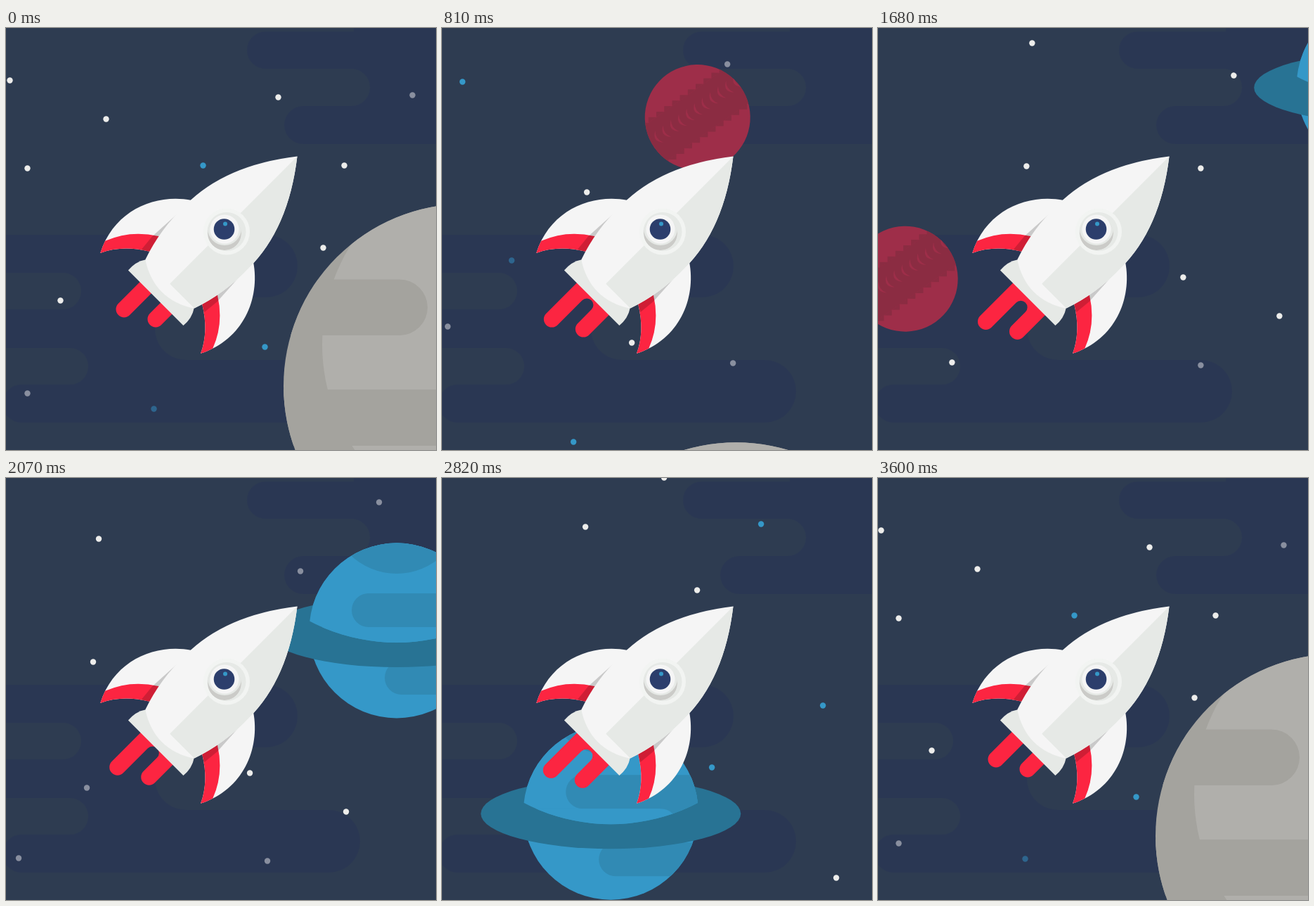
These frames come from a looping animation (612 px wide and 600 px high, 3630 ms). An HTML page with a canvas:

```html
<!DOCTYPE html>
<html lang="en">
<head>
<meta charset="utf-8">
<title>Rocket flight</title>
<style>
html, body { margin: 0; width: 100%; height: 100%; overflow: hidden; background: #2e3c51; }
canvas { display: block; }
</style>
</head>
<body>
<canvas id="stage" width="612" height="600"></canvas>
<script>
const W = 612, H = 600, LOOP = 3630, CYCLE = 3600, STEP = 30;
const TAU = Math.PI * 2;
const ctx = document.getElementById('stage').getContext('2d');

const WHITE = '#f5f5f5', SHADE = '#e6e9e6', RED = '#fc2541';

function disc(c, x, y, r, color) {
  c.fillStyle = color;
  c.beginPath();
  c.arc(x, y, r, 0, TAU);
  c.fill();
}

function pill(c, x1, y1, x2, y2) {
  c.beginPath();
  c.roundRect(x1, y1, x2 - x1, y2 - y1, (y2 - y1) / 2);
  c.fill();
}

function clipDisc(x, y, r) {
  ctx.beginPath();
  ctx.arc(x, y, r, 0, TAU);
  ctx.clip();
}

// Runs a drawing function in its own coordinate system.
function at(x, y, angle, draw) {
  ctx.save();
  ctx.translate(x, y);
  ctx.rotate(angle);
  draw();
  ctx.restore();
}

// Clouds are a translucent layer over the stars.
const clouds = document.createElement('canvas');
clouds.width = W;
clouds.height = H;
{
  const c = clouds.getContext('2d');
  c.fillStyle = '#283456';
  c.fillRect(495, 0, 200, 5);
  pill(c, 343, 5, 700, 58);
  c.fillRect(490, 57, 200, 55);
  pill(c, 396, 111, 700, 165);
  c.fillRect(0, 294, 370, 213);
  pill(c, 300, 294, 415, 383);
  c.fillRect(20, 505, 400, 56);
  pill(c, -5, 507, 300, 561);
  pill(c, 300, 472, 504, 561);
  c.globalCompositeOperation = 'destination-out';
  pill(c, 300, 58, 518, 111);
  pill(c, -60, 348, 107, 400);
  pill(c, -60, 455, 117, 507);
  pill(c, 212, 383, 600, 472);
}

// Star field repeats as a tile while drifting down and left.
const TILE_X = 805, TILE_Y = 600, DRIFT = 806 / CYCLE, FALL = 600 / CYCLE;
const whiteStars = [[5, 74], [142, 129], [30, 199], [387, 98], [481, 195], [451, 312], [77, 387],
  [578, 95], [30, 519], [595, 341], [189, 289], [587, 516]];
const blueStars = [[280, 195], [368, 453], [210, 541]];

const wrap = (v, size) => ((v + 10) % size + size) % size - 10;

function drawStars(t) {
  const plot = (list, color) => list.forEach(([x, y]) =>
    disc(ctx, wrap(x + 0.5 - DRIFT * t, TILE_X), wrap(y + 0.5 + FALL * t, TILE_Y), 4.2, color));
  plot(whiteStars, '#ededeb');
  plot(blueStars, '#3598c8');
}

function drawMoon(t) {
  const early = t < CYCLE / 2;
  const dt = early ? t : t - CYCLE;
  const x = 654 + dt * (early ? -139.5 : -175) / 480;
  const y = 509 + dt * (early ? 201 : 172) / 480;
  at(x, y, 0, () => {
    disc(ctx, 0, 0, 259, '#a4a39e');
    clipDisc(0, 0, 259);
    disc(ctx, 62, -59, 266, '#b0afab');
    ctx.fillStyle = '#a4a39e';
    pill(ctx, -400, -151.5, -54, -72);
    pill(ctx, 72, -151.5, 400, -72);
    pill(ctx, -400, 5, 400, 85);
  });
}

function drawRedPlanet(t) {
  const dt = t - 480, light = '#9e2e49', dark = '#8b2c42';
  at(487 - dt * 269 / 720, 40 + dt * 190 / 720, -0.615, () => {
    disc(ctx, 0, 0, 75, light);
    clipDisc(0, 0, 75);
    ctx.fillStyle = dark;
    ctx.fillRect(-80, -34, 160, 59);
    const pitch = 13.7;
    const tooth = (x, edge, tip, height) => {
      ctx.fillStyle = dark;
      ctx.beginPath();
      ctx.moveTo(x, edge);
      ctx.lineTo(x + tip, edge + height);
      ctx.lineTo(x + pitch, edge);
      ctx.fill();
    };
    for (let x = -82; x < 80; x += pitch) {
      tooth(x + pitch / 2, -34, 4.6, -6.5);
      tooth(x, 25, 9.1, 6.5);
      ctx.fillStyle = light;
      ctx.beginPath();
      ctx.moveTo(x + 8, -19);
      ctx.quadraticCurveTo(x - 5, -9, x + 8, 1);
      ctx.quadraticCurveTo(x + 1, -9, x + 8, -19);
      ctx.fill();
    }
  });
}

function drawBlueGlobe() {
  const dark = '#318ab4';
  ctx.save();
  disc(ctx, 0, 0, 124.5, '#3598c8');
  clipDisc(0, 0, 124.5);
  disc(ctx, 0, -176, 95, dark);
  ctx.fillStyle = dark;
  pill(ctx, -64, -53, 200, -5);
  ctx.fillRect(70, -29, 80, 70);
  pill(ctx, -17, 43, 200, 91);
  ctx.fillStyle = '#3598c8';
  pill(ctx, -200, -5, 95, 43);
  ctx.restore();
}

function drawBluePlanet(t) {
  const dt = t - 2070;
  at(556 - dt * 0.421, 217 + dt * 0.3443, 0, () => {
    drawBlueGlobe();
    ctx.fillStyle = '#287394';
    ctx.beginPath();
    ctx.ellipse(0, 2, 185, 50, 0, 0, TAU);
    ctx.fill();
    clipDisc(0, -250, 267);
    drawBlueGlobe();
  });
}

// Rocket space: x points to the nose, the window is the origin.
function drawFlames(t) {
  const push = (1 - Math.cos(TAU * t / 1200)) / 2;
  const r = 11.5, left = -20.5, right = 21.2;
  const middle = (left + right) / 2, gap = (right - left) / 2 - r;
  const quarter = Math.PI / 2;
  ctx.save();
  ctx.translate(-25 * push, 2.3 * push);
  ctx.fillStyle = RED;
  ctx.beginPath();
  ctx.moveTo(-70, left - r);
  ctx.arc(-181.7, left, r, -quarter, quarter, true);
  ctx.arc(-132.2, middle, gap, -quarter, quarter);
  ctx.arc(-159.8, right, r, -quarter, quarter, true);
  ctx.lineTo(-70, right + r);
  ctx.fill();
  ctx.restore();
}

function drawFin(side) {
  ctx.save();
  ctx.scale(1, side);
  ctx.beginPath();
  ctx.moveTo(-4, 62);
  ctx.bezierCurveTo(-34, 106, -92, 130, -149, 101);
  ctx.quadraticCurveTo(-118.5, 87, -98, 53);
  ctx.lineTo(-60, 40);
  ctx.closePath();
  ctx.fillStyle = WHITE;
  ctx.fill();
  ctx.clip();
  ctx.fillStyle = RED;
  ctx.beginPath();
  ctx.moveTo(-147, 114);
  ctx.lineTo(-131.5, 108);
  ctx.quadraticCurveTo(-95.5, 94.3, -73.5, 59.4);
  ctx.lineTo(-60, 40);
  ctx.lineTo(-110, 40);
  ctx.lineTo(-170, 112);
  ctx.fill();
  ctx.fillStyle = 'rgba(0,0,0,0.18)';
  ctx.beginPath();
  ctx.moveTo(-34, 63);
  ctx.lineTo(-80, 65.5);
  ctx.lineTo(-106, 63);
  ctx.lineTo(-98, 40);
  ctx.lineTo(-40, 40);
  ctx.fill();
  ctx.restore();
}

function drawHull() {
  ctx.fillStyle = SHADE;
  ctx.beginPath();
  ctx.moveTo(-138.4, -55.5);
  ctx.quadraticCurveTo(-122, -57, -110.5, -49);
  ctx.lineTo(-110.5, 49);
  ctx.quadraticCurveTo(-122, 57, -138.4, 55.5);
  ctx.fill();

  ctx.beginPath();
  ctx.moveTo(146.4, 0);
  ctx.quadraticCurveTo(65, -64, -15, -63.5);
  ctx.quadraticCurveTo(-65, -65, -110.5, -49);
  ctx.quadraticCurveTo(-142, 0, -110.5, 49);
  ctx.quadraticCurveTo(-65, 65, -15, 63.5);
  ctx.quadraticCurveTo(65, 64, 146.4, 0);
  ctx.fillStyle = WHITE;
  ctx.fill();
  ctx.save();
  ctx.clip();
  ctx.fillStyle = SHADE;
  ctx.fillRect(-110, 0, 260, 70);
  ctx.restore();
}

function drawWindow() {
  disc(ctx, 314, 289.5, 33, '#f2f4f2');
  disc(ctx, 314, 289.5, 27.5, SHADE);
  ctx.save();
  clipDisc(311, 292, 24);
  disc(ctx, 311, 292, 24, '#cbcbc8');
  disc(ctx, 311, 285, 24, SHADE);
  ctx.restore();
  disc(ctx, 311, 286, 20.5, WHITE);
  disc(ctx, 310.5, 286, 14.8, '#2c3e6c');
  disc(ctx, 312, 278.5, 3, '#3598c8');
}

function drawRocket(t) {
  at(311, 286, -Math.PI / 4, () => {
    drawFlames(t);
    drawFin(-1);
    drawFin(1);
    drawHull();
  });
  drawWindow();
}

function draw(t) {
  ctx.fillStyle = '#2e3c51';
  ctx.fillRect(0, 0, W, H);
  drawStars(t);
  ctx.globalAlpha = 0.5;
  ctx.drawImage(clouds, 0, 0);
  ctx.globalAlpha = 1;
  drawRedPlanet(t);
  drawBluePlanet(t);
  drawMoon(t);
  drawRocket(t);
}

const start = performance.now();
function tick() {
  const t = (performance.now() - start) % LOOP;
  draw(Math.floor(t / STEP) * STEP);
  requestAnimationFrame(tick);
}
tick();
</script>
</body>
</html>
```
